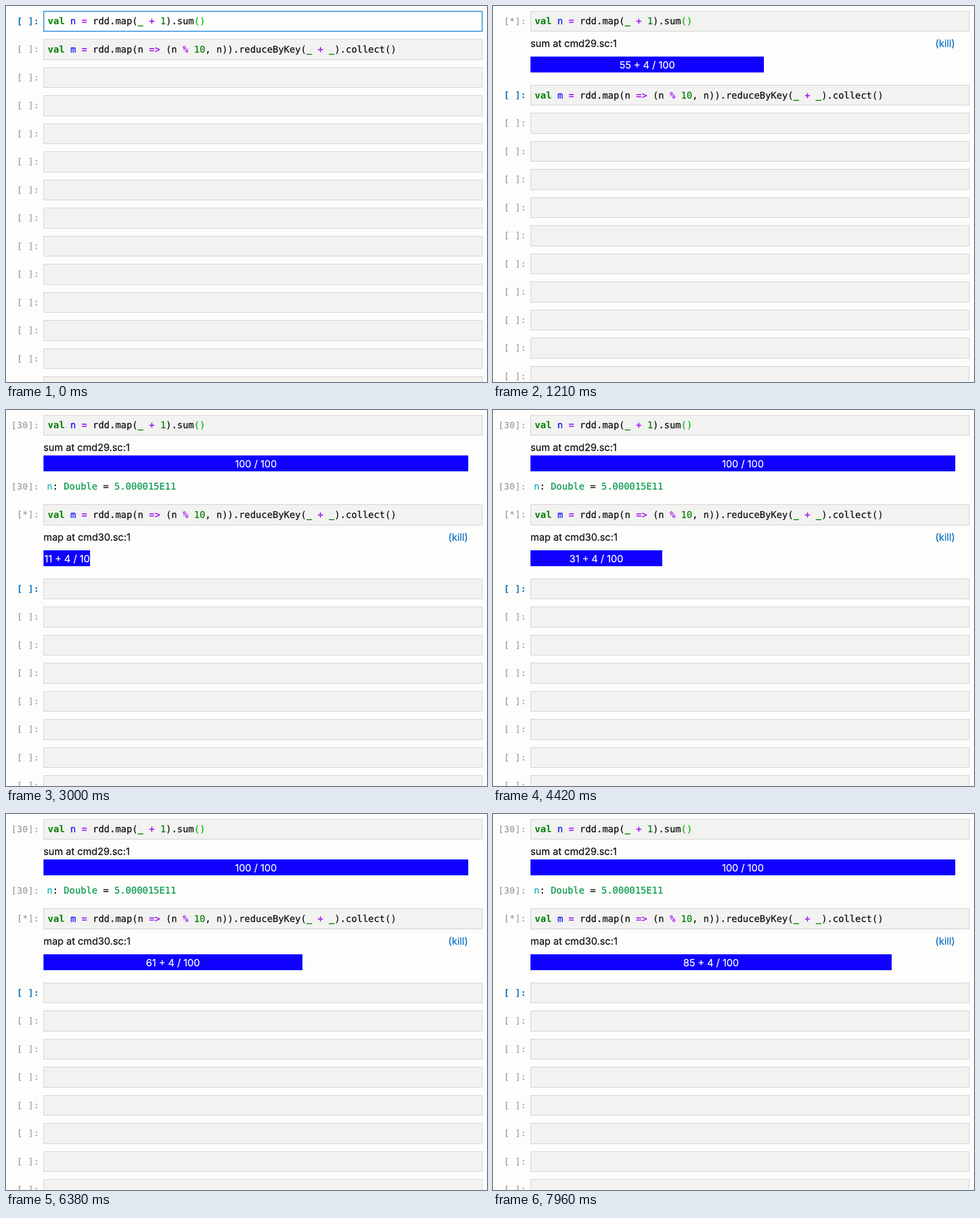
Animation of 847 by 662 pixels, one loop 8 s. Source, as an HTML page:

```html
<!DOCTYPE html>
<html lang="en">
<head>
<meta charset="utf-8">
<title>Notebook run</title>
<style>
  html, body { margin: 0; width: 100%; height: 100%; overflow: hidden; background: #fdfdfc; }
  svg { display: block; }
  text, tspan { white-space: pre; fill: currentColor; stroke: currentColor; stroke-width: .25; text-rendering: geometricPrecision; }
  .code { font: 16.45px "DejaVu Sans Mono", monospace; color: #111; }
  .prompt { font: 15px "DejaVu Sans Mono", monospace; letter-spacing: .87px; color: #9c9c9c; }
  .prompt.on { color: #0a70b8; stroke-width: .6; }
  .out { font: 17.3px Inter, sans-serif; color: #111; }
  .kw { color: #008000; font-weight: bold; stroke-width: 0; }
  .def { color: #1010f0; }
  .op { color: #a41cf5; font-weight: bold; stroke-width: 0; }
  .num { color: #088008; }
  .match { color: #0bb80b; }
  .cell { fill: #f2f2f1; stroke: #cfcfd2; }
  .cell.edit { fill: #fdfdfd; stroke: #1e88dc; stroke-width: 1.6; }
  .bar { fill: #1000ff; }
  .white { color: #fff; text-anchor: middle; }
  .kill { color: #0870c4; text-anchor: end; }
  .name { color: #1cb8b8; }
  .value { color: #069a4c; }
</style>
</head>
<body>
<svg id="stage" width="847" height="662" viewBox="0 0 847 662"></svg>
<script>
const LOOP = 8000, W = 847, H = 662;
const LEFT = 66, FULL = 748, PITCH = 49.5, TOP = 8.6, RUNNING = 130.3;
const stage = document.getElementById('stage');

// Moments in ms: run pressed, output opened, value printed, output settled
const sumJob = { run: 320, open: 520, value: 1560, settle: 1720 };
const mapJob = { run: 2560, open: 2660 };
const sumSteps = [[820, 0], [1520, 100]];
const mapSteps = [[2740, 4], [3000, 11], [4420, 31], [6380, 61], [7960, 85]];

const span = (cls, s) => `<tspan class="${cls}">${s}</tspan>`;
const text = (cls, x, y, s) => `<text class="${cls}" x="${x}" y="${y}">${s}</text>`;
const kw = s => span('kw', s), op = s => span('op', s), num = s => span('num', s);

const sumCode = `${kw('val')} ${span('def', 'n')} ${op('=')} rdd.map(${kw('_')} ${op('+')} ${num(1)}).sum${span('match', '()')}`;
const mapCode = `${kw('val')} ${span('def', 'm')} ${op('=')} rdd.map(n ${op('=&gt;')} (n ${op('%')} ${num(10)}, n)).reduceByKey(${kw('_')} ${op('+')} ${kw('_')}).collect()`;
const result = `${span('name', 'n')}: ${span('value', 'Double')} = ${span('value', '5.000015E11')}`;

function progress(steps, t) {
  if (t < steps[0][0]) return 0;
  for (let i = 1; i < steps.length; i++) {
    const [t0, a] = steps[i - 1], [t1, b] = steps[i];
    if (t < t1) return Math.floor(a + (b - a) * (t - t0) / (t1 - t0));
  }
  return steps[steps.length - 1][1];
}

function prompt(y, mark, on) {
  const s = `[${mark}]:`;
  return text(on ? 'prompt on' : 'prompt', 59 - s.length * 9.9, y, s);
}

function cell(y, mark, code, on, edit) {
  const top = Math.round(y), bottom = Math.round(y + 35.5);
  return `<rect class="cell${edit ? ' edit' : ''}" x="66.5" y="${top + .5}" width="772" height="${bottom - top}"/>`
    + prompt(y + 22.9, mark, on) + text('code', 73.6, y + 23.6, code);
}

// The nested svg clips the label to the filled part
function bar(y, done) {
  if (!done) return '';
  const w = Math.round(FULL * done / 100);
  const left = Math.min(4, 100 - done);
  const label = left ? `${done} + ${left} / 100` : '100 / 100';
  const half = done < 10 ? 42 : 47;
  return `<svg x="${LEFT}" y="${Math.round(y)}" width="${w}" height="28">`
    + `<rect class="bar" width="${w}" height="28"/>`
    + text('out white', Math.max(half, w / 2), 21, label) + '</svg>';
}

function output(y, label, done, settled) {
  return text('out', LEFT, y + 63.8, label)
    + (settled ? '' : text('out kill', 813.5, y + 63.8, '(kill)'))
    + bar(y + (settled ? 71.4 : 80.6), done);
}

function draw(t) {
  const ran = t >= sumJob.run, printed = t >= sumJob.value, settled = t >= sumJob.settle;
  const ran2 = t >= mapJob.run;
  const active = ran2 ? 2 : ran ? 1 : 0;

  let y = TOP;
  let s = cell(y, printed ? '30' : ran ? '*' : ' ', sumCode, !active, !active);
  if (t >= sumJob.open) {
    s += output(y, 'sum at cmd29.sc:1', progress(sumSteps, t), settled);
    y += settled ? 121 : RUNNING;
    if (printed) {
      s += prompt(y + 9.9, '30', false) + text('code', 72, y + 9.9, result);
      y += 36.7;
    }
  } else y += PITCH;

  s += cell(y, ran2 ? '*' : ' ', mapCode, active === 1);
  if (t >= mapJob.open) {
    s += output(y, 'map at cmd30.sc:1', progress(mapSteps, t), false);
    y += RUNNING;
  } else y += PITCH;

  for (let i = 2; y < H; i++, y += PITCH) s += cell(y, ' ', '', active === i);
  return `<rect width="${W}" height="${H}" fill="#fdfdfc"/>` + s;
}

let last = '';
function tick() {
  const view = draw(performance.now() % LOOP);
  if (view !== last) stage.innerHTML = last = view;
  requestAnimationFrame(tick);
}
tick();
</script>
</body>
</html>
```
